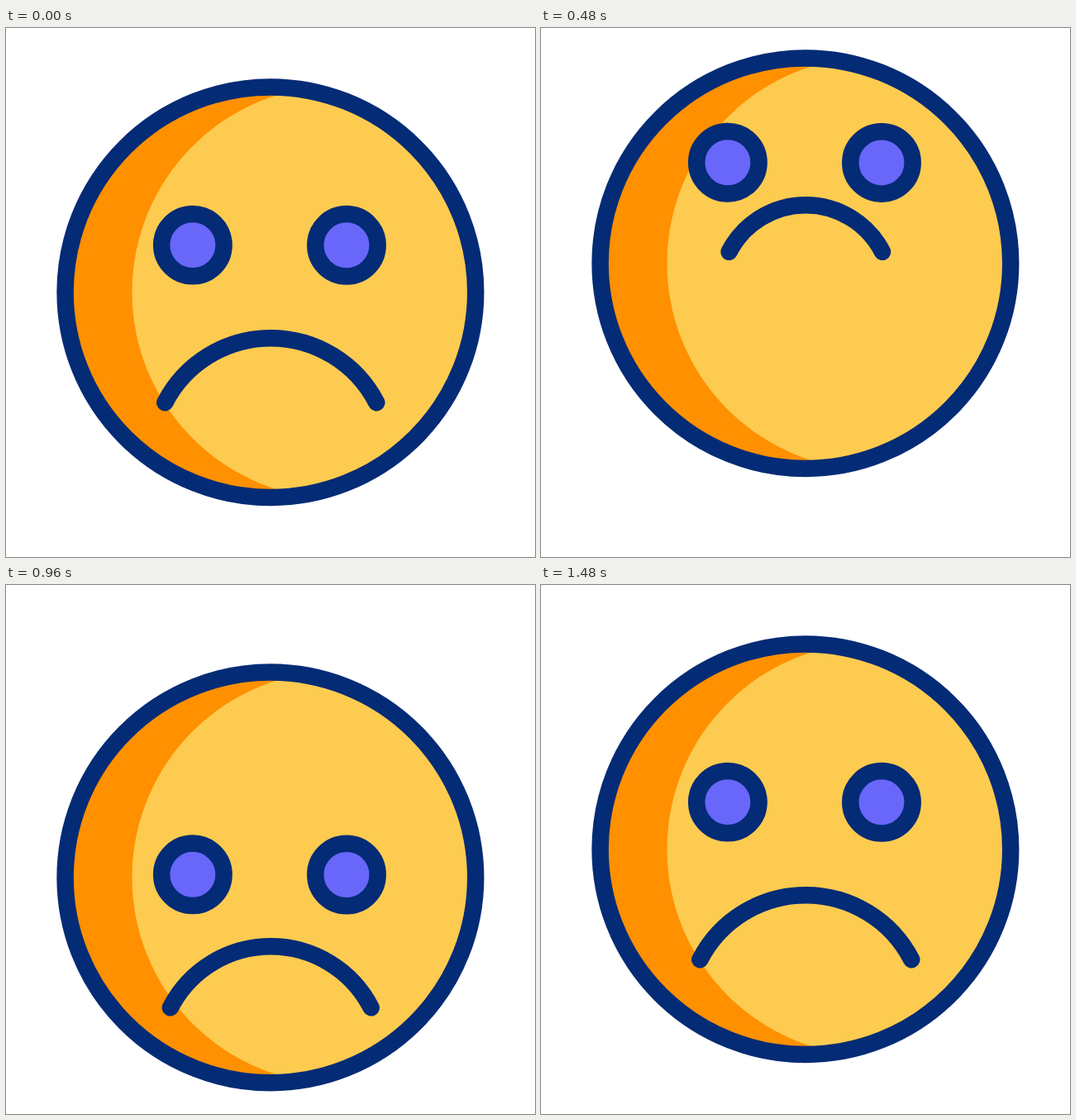
An HTML page that plays this animation: 640 by 640 pixels, repeating every 2 s.

```html
<!DOCTYPE html>
<html lang="en">
<head>
<meta charset="utf-8">
<title>Sad face</title>
<style>
  html, body { margin: 0; width: 100%; height: 100%; overflow: hidden; background: #fff; }
  svg { display: block; width: 100%; height: 100%; }
  .line { stroke: #042b75; stroke-width: 20.5; stroke-linecap: round; }
</style>
</head>
<body>
<svg viewBox="0 0 640 640">
  <defs>
    <clipPath id="disc"><circle cx="319.9" cy="319.7" r="248.3"/></clipPath>
  </defs>
  <g id="face">
    <circle cx="319.9" cy="319.7" r="248.3" fill="#ff9000"/>
    <circle cx="402.5" cy="319.7" r="250" fill="#fdcb50" clip-path="url(#disc)"/>
    <circle class="line" cx="319.9" cy="319.7" r="248.3" fill="none"/>
  </g>
  <g id="eyes" class="line" fill="#6966fa">
    <ellipse cx="225.9" cy="262.6" rx="37.7" ry="37.7"/>
    <ellipse cx="412" cy="262.8" rx="37.7" ry="37.7"/>
  </g>
  <path id="mouth" class="line" fill="none"/>
</svg>
<script>
const LOOP = 2000, STEP = 40;
const $ = id => document.getElementById(id);
const face = $('face'), eyes = $('eyes'), mouth = $('mouth');
const lids = [...eyes.children];

const clamp = u => Math.min(1, Math.max(0, u));

// Ease from time a to b; soft = 0 is linear, 1 is a full smoothstep.
function ease(t, a, b, soft) {
  const u = clamp((t - a) / (b - a));
  return u + soft * (u * u * (3 - 2 * u) - u);
}

// Up to `top`, down to `low`, then back to rest.
function nod(t, top, low, topAt, lowAt, end) {
  const soft = 0.45;
  return top * ease(t, 0, topAt, soft)
    + (low - top) * ease(t, topAt, lowAt, soft)
    - low * ease(t, lowAt, end, soft);
}

// Eyes close partly and reopen as the head drops.
const eyeOpen = t => 0.34 + 0.66 * clamp(Math.abs(t - 720) / 140);

// The mouth shrinks with distance and grows back.
const mouthSize = t => 1 - 0.277 * (ease(t, 0, 500, 1) - ease(t, 500, 1135, 1));

const shift = (el, y) => el.setAttribute('transform', `translate(0 ${y.toFixed(2)})`);

function draw(t) {
  shift(face, nod(t, -35, 35, 480, 970, 1480));
  shift(eyes, nod(t, -108, 88.5, 447, 952, 1462));
  shift(mouth, nod(t, -168, 62.5, 455, 955, 1453));
  for (const lid of lids) lid.setAttribute('ry', 37.7 * eyeOpen(t));
  const s = mouthSize(t), w = 128 * s, r = 144 * s, y = 375.2 + 78 * s;
  mouth.setAttribute('d', `M${320.3 - w} ${y}A${r} ${r} 0 0 1 ${320.3 + w} ${y}`);
}

function tick() {
  const t = performance.now() % LOOP;
  draw(Math.floor(t / STEP) * STEP);
  requestAnimationFrame(tick);
}
tick();
</script>
</body>
</html>
```
